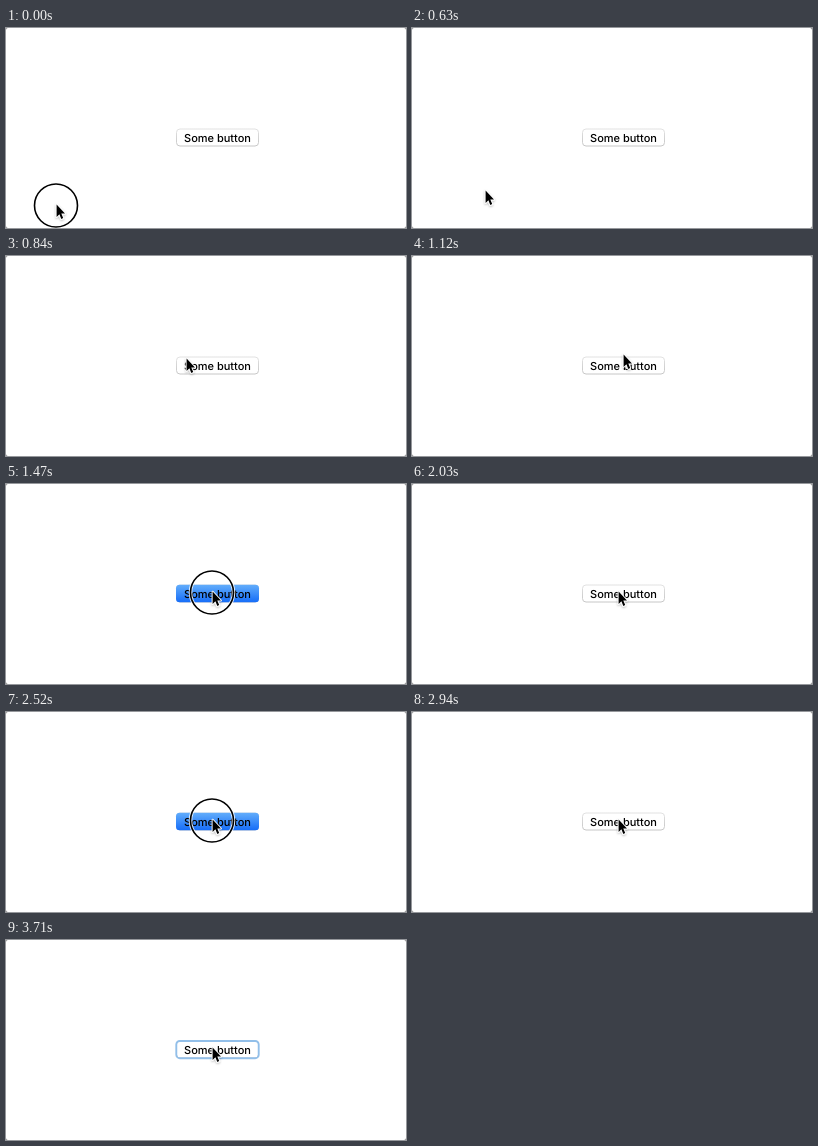
Animation of 400 by 200 pixels, one loop 4.06 s. Source, as an HTML page:

```html
<!DOCTYPE html>
<html lang="en">
<head>
<meta charset="utf-8">
<title>Button press</title>
<style>
  html, body { margin: 0; width: 100%; height: 100%; overflow: hidden; background: #fff; }
  svg { display: block; width: 100%; height: 100%; }
  text { font: 500 11px Inter, Roboto, sans-serif; text-anchor: middle; text-rendering: geometricPrecision; }
</style>
</head>
<body>
<svg viewBox="0 0 400 200">
  <defs>
    <linearGradient id="blue" x2="0" y2="1">
      <stop offset="0" stop-color="#62adfb"/>
      <stop offset="1" stop-color="#166df8"/>
    </linearGradient>
    <linearGradient id="edge" x2="0" y2="1">
      <stop offset="0" stop-color="#e2e2e2"/>
      <stop offset="1" stop-color="#c6c6c6"/>
    </linearGradient>
    <filter id="soft" x="-50%" y="-50%" width="200%" height="200%">
      <feDropShadow dx="0" dy="1" stdDeviation="0.9" flood-opacity="0.3"/>
    </filter>
  </defs>
  <rect width="400" height="200" fill="#fff"/>
  <path fill="#777" fill-rule="evenodd"
    d="M0 0H400V200H0ZM2 0H398Q400 0 400 2V198Q400 200 398 200H2Q0 200 0 198V2Q0 0 2 0Z"/>

  <rect x="170.5" y="101" width="82" height="17" rx="3.5" fill="#fff" stroke="url(#edge)"/>
  <rect id="pressed" x="170" y="100.7" width="83" height="17.5" rx="3.5" fill="url(#blue)"/>
  <rect id="focus" x="170.3" y="101" width="82.4" height="17.2" rx="3.5" fill="none" stroke="#92bfe9" stroke-width="1.9"/>
  <text x="211.5" y="114">Some button</text>

  <g id="pointer">
    <g id="ring" fill="none">
      <circle cy="1.5" r="21.5" stroke="#fff" stroke-width="3.6" stroke-opacity="0.8"/>
      <circle cy="1.5" r="21.5" stroke="#000" stroke-width="1.6"/>
    </g>
    <path filter="url(#soft)" d="M.6 .6V12.9L3.4 10.3L5.3 14.9L7.2 14.1L5.3 9.6H9Z"
      stroke="#fff" stroke-width="1.8" paint-order="stroke" stroke-linejoin="round"/>
  </g>
</svg>
<script>
const LOOP = 4060, TICK = 70, MOVE_START = 630;
const REST = [50, 176];
// Pointer tip at each tick of the move, with a small overshoot past the button
const PATH = [
  [73, 162], [107, 139], [146, 117], [180, 102], [204, 93], [214, 91],
  [216, 92], [211, 98], [208, 103], [206.5, 106], [206, 107]
];
const CLICKS = [[0, 70], [1470, 2030], [2520, 2940]];
const $ = id => document.getElementById(id);
const within = (t, [from, to]) => t >= from && t < to;

function tip(t) {
  if (t < MOVE_START) return REST;
  const step = Math.floor((t - MOVE_START) / TICK);
  return PATH[Math.min(step, PATH.length - 1)];
}

function draw(t) {
  const clicking = CLICKS.some(c => within(t, c));
  $("pointer").setAttribute("transform", `translate(${tip(t)})`);
  $("ring").setAttribute("opacity", clicking ? 1 : 0);
  $("pressed").setAttribute("opacity", clicking && t >= MOVE_START ? 1 : 0);
  $("focus").setAttribute("opacity", t < 3500 ? 0 : t < 3570 ? 0.6 : 1);
}

const start = performance.now();
function frame() {
  draw((performance.now() - start) % LOOP);
  requestAnimationFrame(frame);
}
frame();
</script>
</body>
</html>
```
